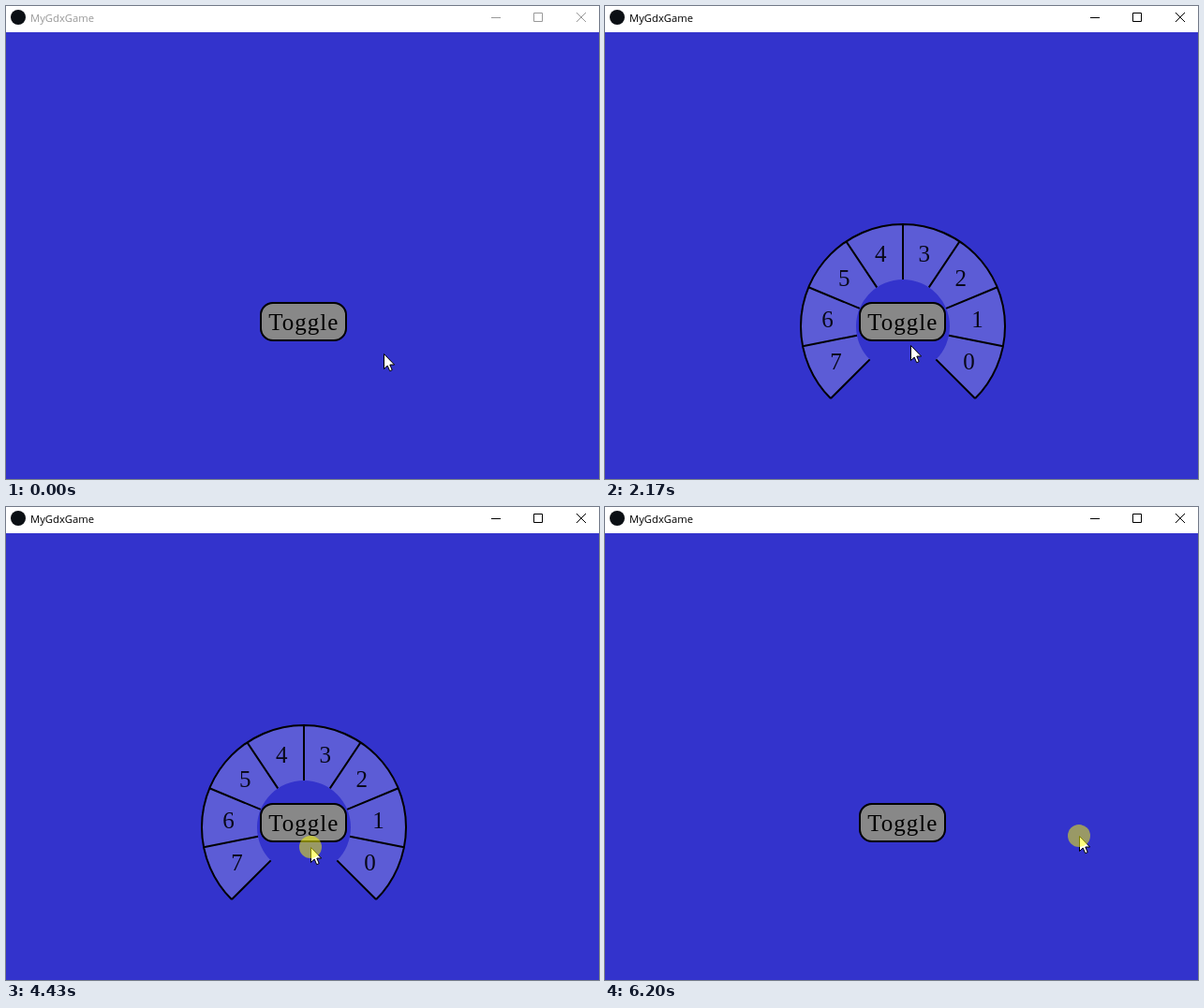
Animation of 633 by 505 pixels, one loop 6.28 s. Source, as an HTML page:

```html
<!DOCTYPE html>
<html lang="en">
<head>
<meta charset="utf-8">
<title>Radial menu toggle</title>
<style>
  html, body { margin: 0; width: 100%; height: 100%; overflow: hidden; background: #33c; }
  svg { display: block; width: 633px; height: 505px; }
  .caption { font: 11.25px "Open Sans", "Noto Sans", sans-serif; }
  .label { font: 25px "Liberation Serif", serif; }
  .toggle { letter-spacing: 1px; }
</style>
</head>
<body>
<svg viewBox="0 0 633 505">
  <rect width="633" height="505" fill="#33c"/>
  <rect width="633" height="28" fill="#fff"/>
  <circle cx="13" cy="12" r="8" fill="#0b0f14"/>
  <g id="titleBar">
    <text class="caption" x="26" y="17" fill="currentColor">MyGdxGame</text>
    <path d="M518 12.5h10M563.5 7.5h9v9h-9zM609 7l10 10M619 7l-10 10" fill="none" stroke="currentColor"/>
  </g>
  <g id="menu"></g>
  <rect id="button" x="272" y="317" width="91" height="40" rx="13" stroke="#000" stroke-width="2"/>
  <text class="label toggle" x="280.3" y="346">Toggle</text>
  <g id="pointer">
    <path d="M.5.5V16.5L4.2 13 6.7 18.7 9.2 17.6 6.8 12H11.6Z" fill="#fff" stroke="#000"/>
    <circle id="press" r="12" fill="#ff0" fill-opacity=".5"/>
  </g>
</svg>
<script>
const LOOP = 6280, TICK = 77.5, TICK_LEAD = 18, LAST_TICK = 80;
const $ = id => document.getElementById(id);
const [titleBar, menu, button, pointer, press] =
  ["titleBar", "menu", "button", "pointer", "press"].map($);

// Turning points of the pointer: [tick, x, y]
const stops = [
  [0, 403, 371], [4, 340, 342], [8, 339, 340],
  [10, 344, 311], [14, 301, 257], [17, 251, 273], [21, 289, 312], [25, 324, 340],
  [30, 328, 377], [34, 328, 354], [37, 330, 348], [51, 330, 348],
  [57, 325, 363], [60, 324, 350], [63, 323, 367], [67, 323, 367],
  [71, 329, 346], [75, 412, 272], [80, 506, 351]
];
// Mouse button held: [down tick, up tick]
const clicks = [[5, 7], [34, 41], [46, 48], [51, 63], [70, 72], [80, 81]];

function pointerAt(n) {
  const i = Math.max(1, stops.findIndex(stop => stop[0] >= n));
  const [t0, x0, y0] = stops[i - 1], [t1, x1, y1] = stops[i];
  const k = (n - t0) / (t1 - t0);
  return [Math.round(x0 + (x1 - x0) * k), Math.round(y0 + (y1 - y0) * k)];
}

const overButton = ([x, y]) => x >= 271 && x < 364 && y >= 316 && y < 358;

// A click toggles the menu only when it is released over the button
const menuShown = n =>
  clicks.filter(([, up]) => up <= n && overButton(pointerAt(up))).length % 2 === 1;

function buildMenu() {
  const cx = 318, cy = 342, inner = 50, outer = 109, labelRadius = 80.5, slices = 8;
  const at = (r, deg) => {
    const a = deg * Math.PI / 180;
    return [cx + r * Math.cos(a), cy + r * Math.sin(a)].map(v => +v.toFixed(2));
  };
  const arc = (r, to, sweep) => `A${r} ${r} 0 1 ${sweep} ${at(r, to)}`;
  const rim = `M${at(outer, 135)}${arc(outer, 45, 1)}`;
  const angle = i => 45 - i * 270 / slices;
  let spokes = "", labels = "";
  for (let i = 0; i <= slices; i++) {
    spokes += `M${at(inner, angle(i))}L${at(outer, angle(i))}`;
    if (i === slices) break;
    const [x, y] = at(labelRadius, angle(i + .5));
    labels += `<text class="label" x="${x - .5}" y="${y + 8.5}" text-anchor="middle" fill="#080818">${i}</text>`;
  }
  menu.innerHTML =
    `<path d="${rim}L${at(inner, 45)}${arc(inner, 135, 0)}Z" fill="#5c5cd6"/>` +
    `<path d="${rim}${spokes}" fill="none" stroke="#000" stroke-width="2"/>` + labels;
}

function draw(time) {
  const n = Math.min(LAST_TICK, Math.floor((time % LOOP + TICK_LEAD) / TICK));
  const position = pointerAt(n);
  const held = clicks.some(([down, up]) => n >= down && n < up);
  titleBar.style.color = n >= clicks[0][0] ? "#000" : "#999";
  menu.style.display = menuShown(n) ? "" : "none";
  button.setAttribute("fill", !overButton(position) ? "#888" : held ? "#383838" : "#ddd");
  pointer.setAttribute("transform", `translate(${position})`);
  press.style.display = held ? "" : "none";
}

buildMenu();
const start = performance.now();
function frame() {
  draw(performance.now() - start);
  requestAnimationFrame(frame);
}
frame();
</script>
</body>
</html>
```
